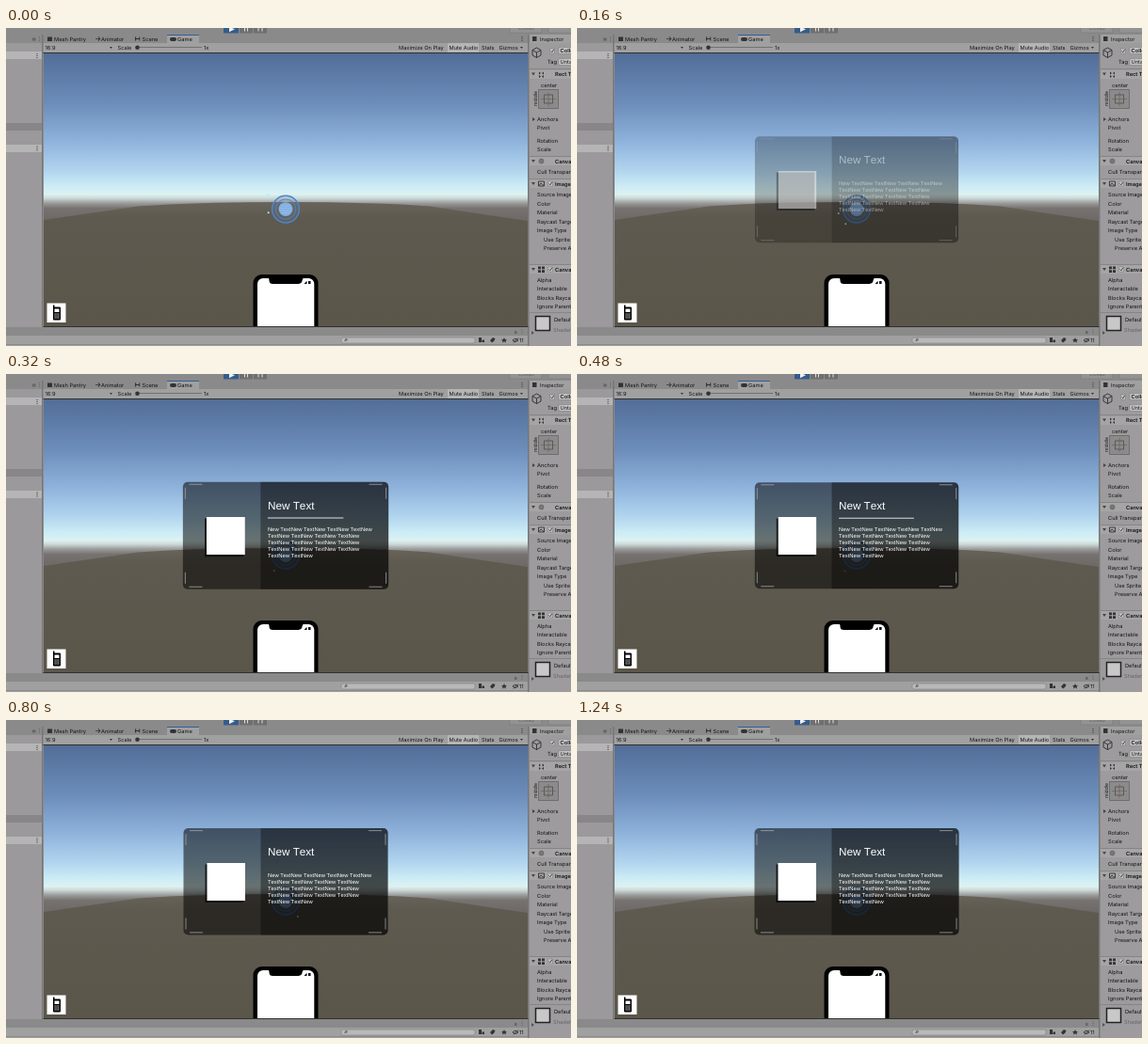
Animation of 600 by 338 pixels, one loop 1.28 s. Source, as an HTML page:

```html
<!DOCTYPE html>
<html lang="en">
<head>
<meta charset="utf-8">
<title>Popup card in an editor</title>
<style>
  html, body { margin: 0; width: 100%; height: 100%; overflow: hidden; background: #9d9b9d; }
  svg { display: block; width: 600px; height: 338px; text-rendering: geometricPrecision; }
  text { font: 5.7px Inter, sans-serif; fill: #141414; }
  .bold { font-weight: 600; }
  #card > * { opacity: var(--fade); }
  #card text { font: 5.84px "Liberation Sans", sans-serif; font-kerning: none; fill: #fff; }
  #card .title { font-size: 11.7px; }
</style>
</head>
<body>
<svg viewBox="0 0 600 338">
  <defs>
    <linearGradient id="sky" gradientUnits="userSpaceOnUse" x1="0" y1="27" x2="0" y2="204">
      <stop offset="0" stop-color="#526d98"/>
      <stop offset=".3" stop-color="#6c8dba"/>
      <stop offset=".52" stop-color="#8db1da"/>
      <stop offset=".7" stop-color="#b0d4ee"/>
      <stop offset=".8" stop-color="#cdecf6"/>
      <stop offset=".847" stop-color="#dcf2f1"/>
      <stop offset=".87" stop-color="#ccd8d7"/>
      <stop offset=".9" stop-color="#999a9a"/>
      <stop offset=".93" stop-color="#767270"/>
      <stop offset="1" stop-color="#6e6967"/>
    </linearGradient>
    <linearGradient id="floor" x2="0" y2="1">
      <stop offset="0" stop-color="#69645b"/>
      <stop offset=".12" stop-color="#5f5a4f"/>
      <stop offset="1" stop-color="#5b564a"/>
    </linearGradient>
    <clipPath id="view"><path d="M40 27h514v290H40z"/></clipPath>
    <path id="corner" d="M195 117.600h14M191 121v12" fill="none" stroke="#a0a4a6" stroke-width=".8"/>
  </defs>

  <!-- editor chrome -->
  <path fill="#8b8a8b" d="M0 0h600v16H0zM0 318h554v9H0z"/>
  <path fill="#a1a0a1" d="M40 16h514v10H40zM171 7h34v9h-34zM0 327h554v11H0zM556 7h44v9h-44z"/>
  <path fill="#9b999b" d="M0 16h38v302H0z"/>
  <path fill="#b6b5b6" d="M0 25h38v8H0zM0 124h38v8H0zM469 16h33v10h-33z"/>
  <path fill="#888688" d="M0 101h38v8H0z"/>
  <path fill="#777" d="M38 7h1.500v311H38zM554 7h1.500v331h-1.500zM0 336.500h554v.6H0z"/>
  <path fill="#303030" d="M39.500 26h515v1h-515zM39.500 317h515v1h-515z"/>
  <path fill="#2f6096" d="M171 7h34v1h-34z"/>
  <path fill="#355c8a" d="M231 0h16v5.500h-16z"/>
  <path fill="#6f6f6f" d="M248 0h14v5.500h-14zM263 0h14v5.500h-14z"/>
  <path fill="#eee" d="M237 0h3l3 1.200-6 3z"/>
  <path stroke="#ddd" d="M253.500 0v3.500m3-3.500v3.500M268 0v3.500m4-3.500v3.500"/>
  <path fill="#939393" stroke="#777" stroke-width=".5" d="M535-1h34v6h-34zM576-1h25v6h-25z"/>
  <g fill="#333">
    <path d="M44 9.500h5v4.500h-5zM95 11h4l-1.500-1.500.6-.6 2.400 2.500-2.400 2.500-.6-.6 1.500-1.500h-4zM137 9.500h1.200v1.500h3v-1.500h1v4h-1V12h-3v1.500H137z"/>
    <rect x="174" y="10" width="7" height="4" rx="2"/>
    <path d="M110 20h3l-1.500 2zM546 20h3l-1.500 2zM559 9h4.500v5H559z"/>
    <path d="M502 329h3v5h-3zM505.500 331.500h2.500v2.500h-2.500zM514 332l3-3 2.500 1-1 2.500-2.500 2zM529 329l1 2h2l-1.500 1.400.5 2-2-1.200-2 1.200.5-2-1.500-1.400h2z"/>
    <path fill="#666" d="M28 10.500h3.500v3H28zM540 322h2.500v3H540z"/>
  </g>
  <path stroke="#333" stroke-dasharray="1 1" d="M33 27v5M33 125.500v5M548 9v5"/>
  <path stroke="#666" stroke-dasharray="1 1" d="M35.500 9v5M548 320v5"/>
  <path stroke="#555" stroke-width=".6" d="M139 20.500h69"/>
  <circle cx="139.500" cy="20.700" r="2.300" fill="#333"/>
  <rect x="356" y="329" width="142" height="6" rx="2" fill="#b9b9b9" stroke="#777" stroke-width=".5"/>
  <path d="M359.500 333l1.300-1.300" stroke="#333" stroke-width=".7"/>
  <circle cx="361.300" cy="331.300" r="1" fill="none" stroke="#333" stroke-width=".6"/>
  <path d="M538 332q3-3.500 6 0q-3 3-6 0M539 334.500l5-5" fill="none" stroke="#222" stroke-width=".8"/>

  <!-- inspector -->
  <path fill="#a6a5a6" d="M556 137h44v9h-44zM556 161h44v9h-44zM556 252h44v9h-44zM556 45h44v9h-44z"/>
  <path stroke="#777" stroke-width=".6" d="M556 43.500h44M556 136.500h44M556 160.500h44M556 251.500h44M556 302.500h44"/>
  <path fill="#c4c4c4" stroke="#777" stroke-width=".5" d="M587 20.500h14v7h-14zM587 32.500h14v7h-14zM577.500 22h5v5h-5zM575.500 163h5v5h-5zM575.500 254h5v5h-5z"/>
  <path fill="none" stroke="#222" stroke-width=".8" d="M578.500 24.500l1.300 1.300 2-3M576.500 165.500l1.300 1.300 2-3M576.500 256.500l1.300 1.300 2-3"/>
  <path fill="none" stroke="#222" stroke-width=".8" d="M559 23.500l4.500-2.500 4.500 2.500v5.500l-4.500 2.500-4.500-2.500zl4.500 2.500 4.500-2.500M563.500 26v5.500"/>
  <path fill="#444" d="M558 47.500h4l-2 3zM558 140h4l-2 3zM558 164h4l-2 3zM558 255h4l-2 3zM559 95l3 2-3 2z"/>
  <path fill="#8b8b8b" stroke="#555" stroke-width=".6" d="M565.500 65.500h21v20h-21z"/>
  <path fill="none" stroke="#444" stroke-width=".7" d="M571.500 71h9v9h-9z"/>
  <path stroke="#755855" stroke-width=".6" d="M568 75.500h16M576 68v15"/>
  <path fill="none" stroke="#333" stroke-width=".9" d="M565.500 163h6v5h-6zM566 167.500l2-2.500 3 2.500"/>
  <path fill="#333" d="M565 253.500h3v2.700h-3zM569 253.500h3v2.700h-3zM565 257.300h3v2.700h-3zM569 257.300h3v2.700h-3zM566 46.500l2 1.500-2 1.500zM571 46.500l-2 1.500 2 1.500zM566 50l2 1.500-2 1.500zM571 50l-2 1.500 2 1.500z"/>
  <circle cx="568.500" cy="141.500" r="2.500" fill="#777" stroke="#666" stroke-width=".8"/>
  <rect x="562.500" y="306.500" width="15" height="15" fill="#c8c8c8" stroke="#222" stroke-width="1.500"/>
  <path fill="#555" d="M558 322l3 2-3 2z"/>
  <g id="labels"></g>
  <text transform="translate(564 83) rotate(-90)" style="font-size:5px">middle</text>

  <!-- game view -->
  <g clip-path="url(#view)">
    <path fill="url(#sky)" d="M40 27h514v290H40z"/>
    <path fill="url(#floor)" d="M40 204L140 189.500Q200 185 297 185T450 189.500L554 205V317H40z"/>
    <g id="button">
      <circle cx="297" cy="192.600" r="14.400" fill="#5b7fae" fill-opacity=".25" stroke="#4b87cf" stroke-width="1.400"/>
      <circle cx="297" cy="192.600" r="10.600" fill="none" stroke="#5585bd" stroke-width=".9"/>
      <circle cx="297" cy="192.600" r="7.400" fill="#83b0e2"/>
      <path stroke="#a0c2e8" stroke-width=".6" d="M292 189h10M290 191.500h14M290 194h14M292 196.500h10"/>
    </g>
    <g id="sparks" fill="#bdebf8"></g>
    <rect x="262.500" y="262" width="69" height="80" rx="9"/>
    <rect x="267" y="266" width="60.300" height="80" rx="6" fill="#fff"/>
    <path d="M277 265.500h40q-2.500.5-2.500 3t-4 3.500h-27q-4 0-4-3.500t-2.500-3z"/>
    <path d="M316.500 272l3-3.200v3.200zM321 269h2.500v3H321z"/>
    <path fill="#fff" d="M43.500 292.500h20v20.500h-20z"/>
    <path d="M50 294.500h1.500v2h5.500q1 0 1 1v12q0 1-1 1h-6q-1 0-1-1z"/>
    <path fill="#fff" d="M51.500 298.500h5v3.500h-5z"/>
    <path stroke="#fff" stroke-width="1" stroke-dasharray="1.200 .7" d="M51.500 304h5M51.500 306h5M51.500 308h5"/>
    <g id="card">
      <rect x="188.500" y="115" width="217" height="113.500" rx="5" fill-opacity=".53"/>
      <path fill-opacity=".36" d="M270.500 115H400.500q5 0 5 5v103.500q0 5-5 5h-130z"/>
      <use href="#corner"/>
      <use href="#corner" transform="matrix(-1 0 0 1 594 0)"/>
      <use href="#corner" transform="matrix(1 0 0 -1 0 343.500)"/>
      <use href="#corner" transform="matrix(-1 0 0 -1 594 343.500)"/>
      <path fill-opacity=".75" d="M211.500 153.500H252V194h-40.500z"/>
      <path fill="#fff" d="M213.500 152H254v40h-40.500z"/>
      <text class="title" x="278" y="144">New Text</text>
      <path id="rule" fill="#ddd" d="M278 152.700h80v.9h-80z"/>
      <g id="copy"></g>
    </g>
  </g>
</svg>
<script>
const LOOP = 1280;
const $ = id => document.getElementById(id);

function add(parent, tag, attrs, content = "") {
  const el = document.createElementNS("http://www.w3.org/2000/svg", tag);
  for (const name in attrs) el.setAttribute(name, attrs[name]);
  el.textContent = content;
  $(parent).append(el);
  return el;
}

const label = (x, middle, content, attrs) =>
  add("labels", "text", { x, y: middle + 2, ...attrs }, content);

[[51, 12, "Mesh Pantry"], [101, 12, "Animator"], [144.5, 12, "Scene"], [182, 12, "Game"],
 [41.5, 20.5, "16:9"], [118.5, 20.5, "Scale"], [210, 20.5, "1x"],
 [417, 20.5, "Maximize On Play"], [470.5, 20.5, "Mute Audio"], [505, 20.5, "Stats"],
 [523.5, 20.5, "Gizmos"], [545, 332, "11"], [567, 12, "Inspector"], [575, 36, "Tag"],
 [588.5, 36, "Untagged"], [568, 61, "center"], [564, 97, "Anchors"], [564, 106, "Pivot"],
 [564, 119.5, "Rotation"], [564, 129, "Scale"], [564, 153, "Cull Transparent"],
 [564, 177, "Source Image"], [564, 187, "Color"], [564, 196, "Material"],
 [564, 205.5, "Raycast Target"], [564, 215, "Image Type"], [571, 225, "Use Sprite"],
 [571, 234, "Preserve Aspect"], [564, 268, "Alpha"], [564, 277, "Interactable"],
 [564, 287, "Blocks Raycasts"], [564, 296, "Ignore Parent"], [582, 310, "Default"]
].forEach(item => label(...item));

[[588.5, 24, "Collection"], [583, 49, "Rect Transform"], [583, 141.5, "Canvas"],
 [583, 165.5, "Image"], [583, 256.5, "Canvas"]
].forEach(item => label(...item, { class: "bold" }));
label(581, 321, "Shader", { style: "fill:#666" });
label(544, 0, "Collab", { style: "fill:#666" });

const words = count => Array(count).fill("TextNew").join(" ");
["New " + words(4), words(4), words(4), words(4), words(2)].forEach((line, i) =>
  add("copy", "text", { x: 278, y: 167.2 + i * 6.95 }, line));

// Each spark: start, end, x, y, drift x, drift y, radius
const sparks = [
  [-60, 110, 278.5, 179, -1, -3, 1.8],
  [-60, 300, 279, 196, -2, 1.5, 1],
  [90, 580, 285.5, 208, -1.5, 2, 1],
  [700, 920, 309, 208.5, 2, 1, 1.1]
].map(spec => ({ spec, el: add("sparks", "circle", { r: spec[6] }) }));

const clamp = v => Math.max(0, Math.min(1, v));

// Interpolates between [time, value] pairs
function track(keys, t) {
  const i = keys.findIndex(([time]) => time > t);
  if (i < 0) return keys[keys.length - 1][1];
  const [t0, v0] = keys[i - 1], [t1, v1] = keys[i];
  return v0 + (v1 - v0) * (t - t0) / (t1 - t0);
}

const scaleKeys = [[0, .996], [240, .996], [320, 1.006], [480, .997], [640, 1]];

function draw(t) {
  const s = track(scaleKeys, t);
  // Card layers fade one by one, so overlapping ones show through each other
  $("card").style.setProperty("--fade", clamp((t - 20) / 290));
  $("card").setAttribute("transform", `translate(297 171.75) scale(${s}) translate(-297 -171.75)`);
  $("rule").setAttribute("visibility", t >= 200 && t < 640 ? "visible" : "hidden");
  for (const { spec: [start, end, x, y, dx, dy], el } of sparks) {
    const p = (t - start) / (end - start);
    el.setAttribute("cx", x + dx * p);
    el.setAttribute("cy", y + dy * p);
    el.setAttribute("opacity", p < 0 ? 0 : clamp((1 - p) * 3));
  }
}

const begin = performance.now();
function frame() {
  draw((performance.now() - begin) % LOOP);
  requestAnimationFrame(frame);
}
frame();
</script>
</body>
</html>
```
